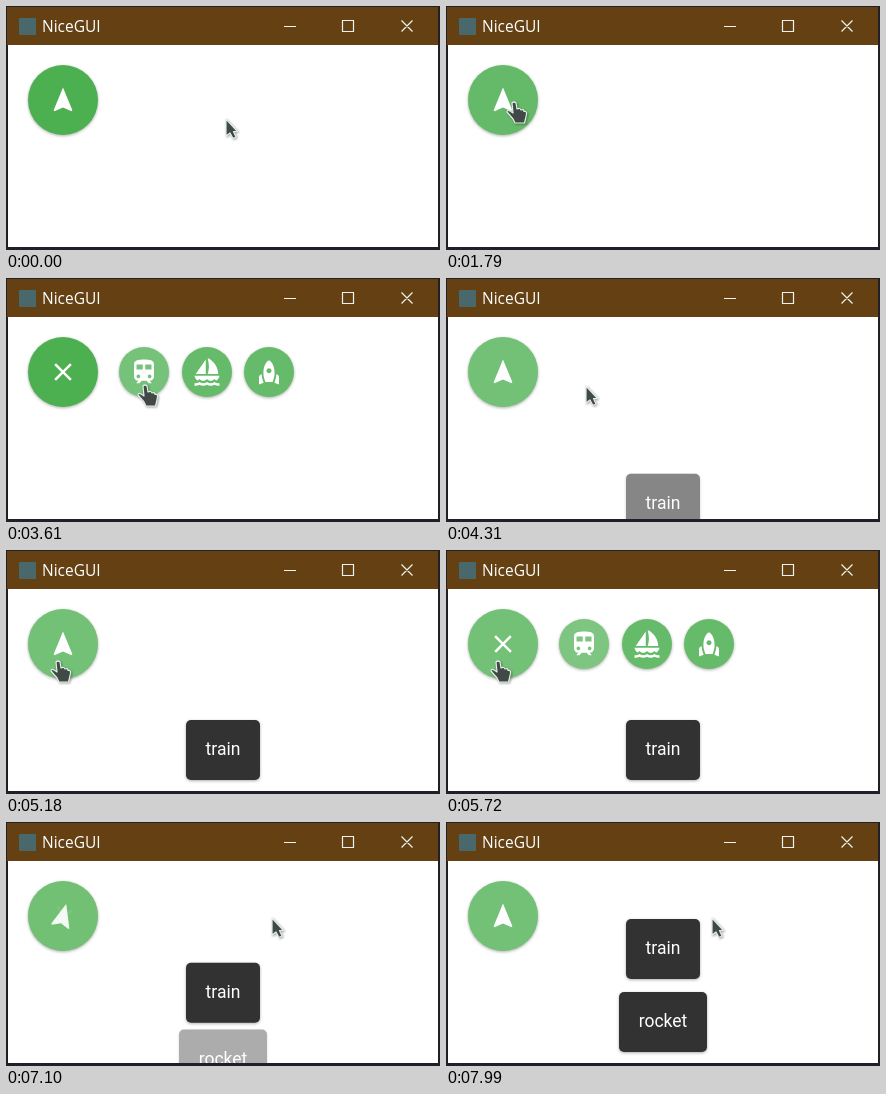
An HTML page for the animation above (8330 ms loop, 434 by 244 pixels).

```html
<!DOCTYPE html>
<html lang="en">
<head>
<meta charset="utf-8">
<title>NiceGUI</title>
<style>
  html, body { margin: 0; width: 100%; height: 100%; overflow: hidden; }
  svg { display: block; width: 434px; height: 244px; }
  .title { font: 15.5px "Open Sans", "Noto Sans", sans-serif; fill: #fff; }
  .toast text { font: 17.5px Roboto, sans-serif; fill: #fff; text-anchor: middle; }
  .toast rect { fill: #323232; }
  .toast, .fab { filter: drop-shadow(0 1.5px 1.5px rgba(0, 0, 0, .32)); }
  .icon { fill: #fff; }
  #cursor { filter: drop-shadow(1px 1px 1px rgba(0, 0, 0, .35)); }
  #cursor path { fill: #404946; stroke: #e4eee8; stroke-width: 1.2; stroke-linejoin: round; }
</style>
</head>
<body>
<svg viewBox="0 0 434 244">
  <defs>
    <clipPath id="page"><rect x="2" y="39" width="430" height="202"/></clipPath>
  </defs>
  <rect width="434" height="244" fill="#202026"/>
  <rect x="1" y="1" width="431" height="38" fill="#644012"/>
  <rect x="2" y="39" width="430" height="202" fill="#fff"/>
  <rect x="13" y="12" width="17" height="17" fill="#48686b"/>
  <text class="title" x="36" y="26">NiceGUI</text>
  <path d="M278 20.5h12M336.5 14.5h11v11h-11zM395.5 14.5l11 11m0-11l-11 11" fill="none" stroke="#eef3ec" stroke-width="1.2"/>

  <g clip-path="url(#page)">
    <g id="actions"></g>
    <g class="fab">
      <circle cx="57" cy="94" r="35" fill="#4caf50"/>
      <circle id="mainLight" cx="57" cy="94" r="35" fill="#fff"/>
    </g>
    <path id="navIcon" class="icon" d="M12 2L4.5 20.29l.71.71L12 18l6.79 3 .71-.71z"/>
    <path id="closeIcon" class="icon" d="M19 6.41L17.59 5 12 10.59 6.41 5 5 6.41 10.59 12 5 17.59 6.41 19 12 13.41 17.59 19 19 17.59 13.41 12z"/>
    <g id="train" class="toast"><rect x="180" y="170" width="74" height="60" rx="5"/><text x="217" y="205">train</text></g>
    <g id="rocket" class="toast"><rect x="173" y="170" width="88" height="60" rx="5"/><text x="217" y="205">rocket</text></g>
    <g id="cursor">
      <path id="arrow" d="M1 1V18L5 15 8 20.5 11 19 8.5 13.5H12.5Z"/>
      <path id="hand" d="M-2 1Q0-1 2 1L3 7Q6 5.5 7 8 10 7 10 9.5 13 9 12.5 12L11.5 17 10.5 21H1L-1 17-7 10Q-7 7.5-4 9L-1 11Z"/>
    </g>
  </g>
</svg>
<script>
const LOOP = 8330;
const $ = id => document.getElementById(id);

function bezier(x1, y1, x2, y2) {
  const curve = (a, b, s) => 3 * a * s * (1 - s) ** 2 + 3 * b * s * s * (1 - s) + s ** 3;
  return x => {
    if (x <= 0) return 0;
    if (x >= 1) return 1;
    let lo = 0, hi = 1;
    for (let i = 0; i < 24; i++) {
      const mid = (lo + hi) / 2;
      if (curve(x1, x2, mid) < x) lo = mid; else hi = mid;
    }
    return curve(y1, y2, lo);
  };
}
const ease = bezier(.25, .1, .25, 1);
const easeIn = bezier(.42, 0, 1, 1);
const easeHover = bezier(.25, .8, .5, 1);

// Value of a CSS-like transition whose target changes at the listed times
const transition = (t, changes, duration, easing) =>
  changes.reduce((v, [start, target]) => v + (target - v) * easing((t - start) / duration), 0);

const openings = [[2400, 1], [3810, 0], [5350, 1], [6840, 0]];
const mainHover = [[1530, .15], [3200, 0], [3810, .22], [5830, 0], [6840, .22]];
const trainStart = 3970, rocketStart = 6855;

const actions = [
  { x: 138, hover: [[3480, .15]],
    icon: "M12 2c-4 0-8 .5-8 4v9.5C4 17.43 5.57 19 7.5 19L6 20.5v.5h2.23l2-2H14l2 2h2v-.5L16.5 19c1.93 0 3.5-1.57 3.5-3.5V6c0-3.5-3.58-4-8-4zM7.5 17c-.83 0-1.5-.67-1.5-1.5S6.67 14 7.5 14s1.5.67 1.5 1.5S8.33 17 7.5 17zm3.5-7H6V6h5v4zm2 0V6h5v4h-5zm3.5 7c-.83 0-1.5-.67-1.5-1.5s.67-1.5 1.5-1.5 1.5.67 1.5 1.5-.67 1.5-1.5 1.5z" },
  { x: 201, hover: [],
    icon: "M11 13.5V2L3 13.5h8zM21 13.5C21 6.5 14.5 1 12.5 1c0 0 1 3 1 6.5s-1 6-1 6H21zM22 15H2c.31 1.53 1.16 2.84 2.33 3.73C4.98 18.46 5.55 18.01 6 17.5 6.73 18.34 7.8 19 9 19s2.27-.66 3-1.5c.73.84 1.8 1.5 3 1.5s2.26-.66 3-1.5c.45.51 1.02.96 1.67 1.23C20.84 17.84 21.69 16.53 22 15zM22 23v-2h-1c-1.04 0-2.08-.35-3-1-1.83 1.3-4.17 1.3-6 0-1.83 1.3-4.17 1.3-6 0-.91.65-1.96 1-3 1H2v2h1c1.03 0 2.05-.25 3-.75 1.89 1 4.11 1 6 0 1.89 1 4.11 1 6 0 .95.5 1.97.75 3 .75h1z" },
  { x: 263, hover: [[6280, .15]],
    icon: "M12 2.5s4.5 2.04 4.5 10.5c0 2.49-1.04 5.57-1.6 7H9.1c-.56-1.43-1.6-4.51-1.6-7C7.5 4.54 12 2.5 12 2.5zm2 8.5c0-1.1-.9-2-2-2s-2 .9-2 2 .9 2 2 2 2-.9 2-2zm-6.31 9.52c-.48-1.23-1.52-4.17-1.67-6.87l-1.13.75c-.56.38-.89 1-.89 1.67V22l3.69-1.48zM20 22v-5.93c0-.67-.33-1.29-.89-1.66l-1.13-.75c-.15 2.69-1.2 5.64-1.67 6.87L20 22z" }
];
const iconAt = (x, turn = 0) => `translate(${x} 94) rotate(${turn}) scale(1.25) translate(-12 -12)`;

$("actions").innerHTML = actions.map(({ x, icon }) => `
  <g class="fab">
    <circle cx="${x}" cy="94" r="25" fill="#66bb6a"/>
    <circle class="light" cx="${x}" cy="94" r="25" fill="#fff"/>
  </g>
  <path class="icon" fill-rule="evenodd" transform="${iconAt(x)}" d="${icon}"/>`).join("");
const actionLights = document.querySelectorAll(".light");

// Pointer path: time, x, y
const pointer = [
  [0, 219, 112], [270, 219, 112], [410, 225, 141], [840, 225, 141], [1180, 83, 129],
  [1330, 83, 129], [1700, 68, 96], [3180, 68, 96], [3360, 100, 131], [3540, 139, 107],
  [4400, 139, 107], [4800, 52, 111], [5800, 52, 111], [5980, 130, 133], [6200, 235, 133],
  [6380, 265, 95], [LOOP, 265, 95]
];
function pointerAt(t) {
  const i = pointer.findIndex(p => p[0] > t);
  const [t0, x0, y0] = pointer[i - 1], [t1, x1, y1] = pointer[i];
  const k = (t - t0) / (t1 - t0);
  return [x0 + (x1 - x0) * k, y0 + (y1 - y0) * k];
}

function place(id, transform, opacity) {
  $(id).setAttribute("transform", transform);
  $(id).setAttribute("opacity", opacity);
}

function draw(t) {
  const turn = transition(t, openings, 400, ease);
  const shown = transition(t, openings, 180, easeIn);
  place("navIcon", iconAt(57, 180 * turn), 1 - turn);
  place("closeIcon", iconAt(57, 180 * (turn - 1)), turn);
  const scale = .4 + .6 * shown;
  place("actions", `translate(${107 - 31 * (1 - shown)} 94) scale(${scale}) translate(-107 -94)`, shown);

  $("mainLight").setAttribute("opacity", transition(t, mainHover, 400, easeHover));
  actions.forEach(({ hover }, i) =>
    actionLights[i].setAttribute("opacity", transition(t, hover, 400, easeHover)));

  const trainIn = ease((t - trainStart) / 1000);
  const rocketIn = ease((t - rocketStart) / 1000);
  place("train", `translate(0 ${62.5 * (1 - trainIn) - 73 * rocketIn})`, trainIn);
  place("rocket", `translate(0 ${62.5 * (1 - rocketIn)})`, rocketIn);

  const [x, y] = pointerAt(t);
  const over = (cx, r) => Math.hypot(x - cx, y - 94) < r;
  const pointing = over(57, 35) || shown > .5 && actions.some(a => over(a.x, 25));
  place("cursor", `translate(${x} ${y})`, 1);
  $("hand").setAttribute("opacity", +pointing);
  $("arrow").setAttribute("opacity", +!pointing);
}

const start = performance.now();
function tick() {
  draw((performance.now() - start) % LOOP);
  requestAnimationFrame(tick);
}
tick();
</script>
</body>
</html>
```
